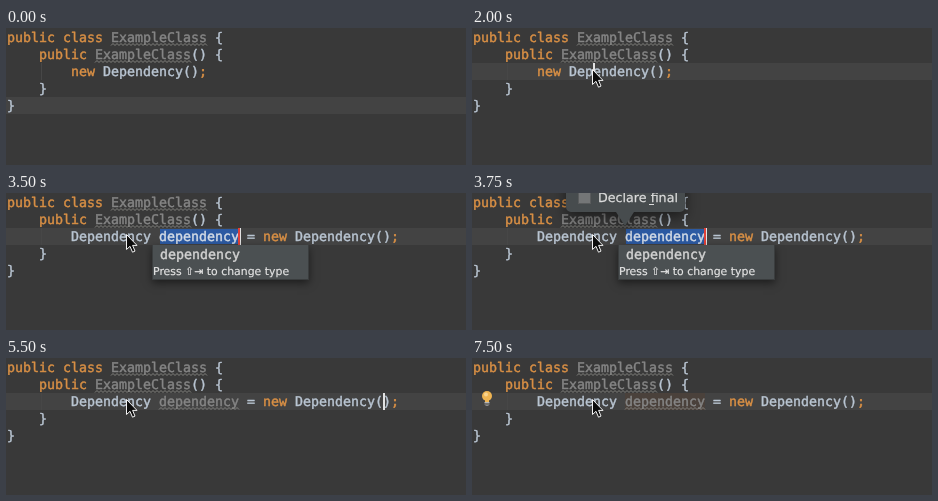
An HTML page with a canvas for the animation above (8000 ms loop, 460x137 px).

```html
<!DOCTYPE html>
<html lang="en">
<head>
<meta charset="utf-8">
<title>Introduce variable</title>
<style>
  html, body { margin: 0; width: 100%; height: 100%; overflow: hidden; background: #393939; }
  canvas { display: block; width: 460px; height: 137px; }
</style>
</head>
<body>
<canvas id="stage" width="460" height="137"></canvas>
<script>
const ctx = document.getElementById('stage').getContext('2d');
const LOOP = 8000, COL = 8, ROW = 17, LEFT = 1, TOP = 1;
const MONO = '13.29px "DejaVu Sans Mono", monospace';
const sans = size => size + 'px "DejaVu Sans", sans-serif';
const C = {
  bg: '#393939', line: '#434343', guide: '#474747',
  text: '#b9c5d2', key: '#d88f45', dim: '#858585', wave: '#8a8a86',
  read: '#3f4c43', write: '#4a413b', brace: '#475b57', select: '#2c5aa3',
  popup: '#4b5052', balloon: '#474c4e', caret: '#e2e2e2'
};

const colX = col => LEFT + col * COL;
const rowY = row => TOP + row * ROW;

function rect(x, y, w, h, color) {
  ctx.fillStyle = color;
  ctx.fillRect(x, y, w, h);
}

// A thin stroke gives the text its heavier weight.
function label(text, x, y, color, font = MONO, weight = 0.45) {
  ctx.font = font;
  ctx.fillStyle = ctx.strokeStyle = color;
  ctx.lineWidth = weight;
  ctx.fillText(text, x, y);
  ctx.strokeText(text, x, y);
}

// Draws alternating text and colour pairs from a column on.
function code(row, col, ...parts) {
  for (let i = 0; i < parts.length; i += 2) {
    label(parts[i], colX(col), rowY(row) + 12.5, parts[i + 1]);
    col += parts[i].length;
  }
}

function mark(row, col, length, color) {
  rect(colX(col), rowY(row), length * COL, ROW, color);
}

function squiggle(row, col, length) {
  const x = colX(col), y = rowY(row) + 16.5;
  ctx.beginPath();
  for (let dx = 0; dx <= length * COL; dx += 2) {
    ctx.lineTo(x + dx, y - (dx % 4 ? 2 : 0));
  }
  ctx.strokeStyle = C.wave;
  ctx.lineWidth = 0.9;
  ctx.stroke();
}

function unused(row, col, name) {
  code(row, col, name, C.dim);
  squiggle(row, col, name.length);
}

function caret(row, col) {
  rect(colX(col), rowY(row), 2, ROW, C.caret);
}

function bulb() {
  ctx.beginPath();
  ctx.arc(15, 38, 5, 0, 7);
  ctx.fillStyle = '#f0b552';
  ctx.fill();
  ctx.beginPath();
  ctx.arc(14, 36.5, 2, 0, 7);
  ctx.fillStyle = '#f9d590';
  ctx.fill();
  rect(13, 42, 4, 2, '#f0b552');
  rect(12.5, 44, 5, 1, '#b8b8b8');
  rect(12.5, 45.5, 5, 1, '#a0a0a0');
  rect(13.5, 47, 3, 1, '#8c8c8c');
}

function pointer(x, y) {
  ctx.save();
  ctx.translate(x, y);
  ctx.beginPath();
  [[0.5, 0.5], [0.5, 15.5], [4, 12.3], [6.5, 18.2], [9, 17.1], [6.6, 11.4], [11, 11.4]]
    .forEach(p => ctx.lineTo(...p));
  ctx.closePath();
  ctx.fillStyle = '#0c0c0c';
  ctx.fill();
  ctx.strokeStyle = '#f2f2f2';
  ctx.lineWidth = 1;
  ctx.stroke();
  ctx.restore();
}

function shadow(blur, dy) {
  ctx.shadowColor = 'rgba(0,0,0,.5)';
  ctx.shadowBlur = blur;
  ctx.shadowOffsetY = dy;
}

function suggestions() {
  ctx.save();
  shadow(8, 3);
  rect(146, 52, 157, 35, '#3a3d3e');
  ctx.restore();
  rect(147, 52, 155, 34, C.popup);
  label('dependency', 154, 65.5, '#d2d2d2');
  label('Press ⇧⇥ to change type', 147, 82, '#e4e4e4', sans(10.9), 0.2);
}

// Balloon hanging from the top edge, its tip on the renamed word.
function options(alpha) {
  ctx.save();
  ctx.globalAlpha = alpha;
  ctx.save();
  shadow(14, 5);
  ctx.beginPath();
  ctx.roundRect(94, -20, 119, 39, 5);
  ctx.moveTo(144, 19);
  ctx.lineTo(153, 33);
  ctx.lineTo(162, 19);
  ctx.fillStyle = C.balloon;
  ctx.fill();
  ctx.restore();
  rect(106, -2, 13, 13, '#5a5c5d');
  rect(107, -1, 11, 11, '#747677');
  label('Declare final', 126, 9, '#dcdcdc', sans(12.7), 0.25);
  rect(177, 11, 5, 1, '#dcdcdc');
  ctx.restore();
}

// Value of the last [time, ...value] step reached.
const at = (steps, t) => steps.filter(s => s[0] <= t).pop();

const POINTER = [[0, 249, -30], [500, 249, -1], [750, 178, 14],
  [1000, 117, 34], [1250, 117, 41], [1500, 120, 41]];
const CARET = [[0, -1], [2000, 15], [3000, -1], [4000, 49], [5250, 48], [5500, 47],
  [5750, 46], [6000, 36], [6250, 30], [6500, 19], [7250, -1]];

function draw(t) {
  const within = (a, b) => t >= a && t < b;
  const extracted = t >= 3500, renaming = within(3500, 4000);
  const braces = within(5750, 6000);

  rect(0, 0, 460, 137, C.bg);
  rect(0, rowY(t < 2000 ? 4 : 2), 460, ROW, C.line);
  rect(35, rowY(2), 1, ROW, C.guide);

  code(0, 0, 'public class ', C.key);
  unused(0, 13, 'ExampleClass');
  code(0, 26, '{', C.text);
  code(1, 4, 'public ', C.key);
  unused(1, 11, 'ExampleClass');
  code(1, 23, '() {', C.text);
  code(3, 4, '}', C.text);
  code(4, 0, '}', C.text);

  if (!extracted) {
    if (t >= 2250) mark(2, 12, 10, C.read);
    code(2, 8, 'new ', C.key, 'Dependency()', C.text, ';', C.key);
  } else {
    if (renaming) rect(colX(19) + 1, rowY(2) + 1, 10 * COL - 2, ROW - 2, C.select);
    if (t >= 6750) mark(2, 19, 10, C.write);
    if (braces) mark(2, 46, 2, C.brace);
    code(2, 8, 'Dependency ', C.text);
    if (t >= 4500) unused(2, 19, 'dependency');
    else code(2, 19, 'dependency', renaming ? '#d3dbe6' : C.text);
    code(2, 30, '= ', C.text, 'new ', C.key, 'Dependency', C.text,
      '()', braces ? '#f4e63c' : C.text, ';', C.key);
  }

  if (renaming) {
    caret(2, 29);
    rect(colX(29) - 1, rowY(2), 2, ROW, '#e04038');
    suggestions();
  }
  if (within(3750, 4250)) options(t < 4000 ? 1 : 0.4);

  const [, col] = at(CARET, t);
  if (col >= 0) caret(2, col);
  if (within(2750, 3500) || t >= 7250) bulb();
  const [, x, y] = at(POINTER, t);
  pointer(x, y);
}

ctx.textBaseline = 'alphabetic';
ctx.textRendering = 'geometricPrecision';
ctx.lineJoin = 'round';
const start = performance.now();
function tick() {
  draw((performance.now() - start) % LOOP);
  requestAnimationFrame(tick);
}
tick();
</script>
</body>
</html>
```
